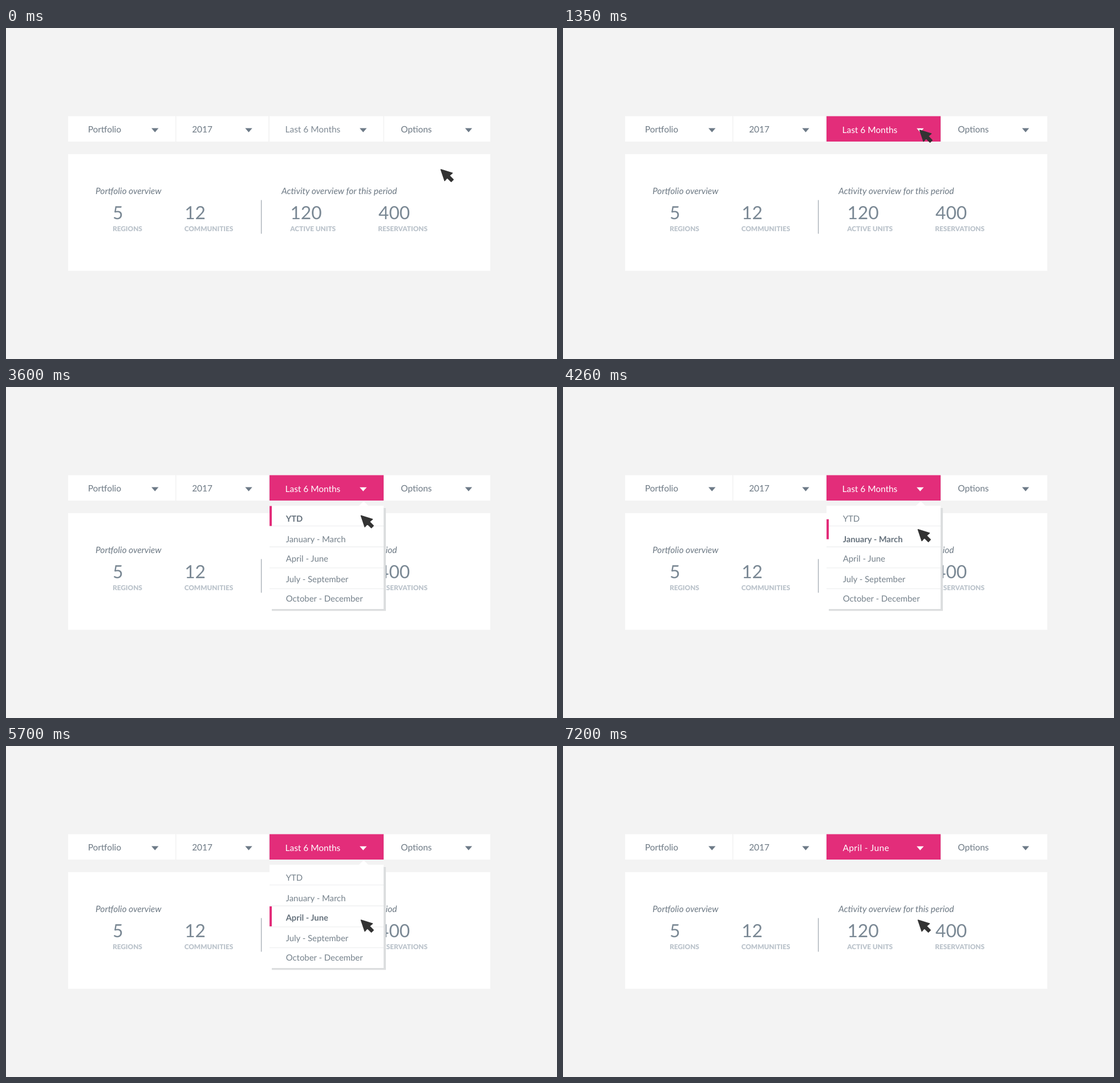
Animation of 966x580 px, one loop 8.1 s. Source, as an HTML page:

```html
<!DOCTYPE html>
<html lang="en">
<head>
<meta charset="utf-8">
<title>Period filter</title>
<style>
  html, body { margin: 0; width: 100%; height: 100%; overflow: hidden; background: #f3f3f3; }
  svg { display: block; width: 966px; height: 580px; }
  text { font-family: Lato, "Open Sans", sans-serif; fill: #6d7984; text-rendering: geometricPrecision; }
  .bar { font-size: 15.4px; }
  .soft { fill: #7f8a94; }
  .white { fill: #fff; }
  .title { font-size: 15.5px; font-style: italic; }
  .num { font-size: 31.7px; fill: #7a8894; }
  .label { font-size: 11.8px; font-weight: 900; fill: #bcc4cc; }
  .item { font-size: 14.9px; fill: #75818b; }
  .bold { font-size: 14.7px; font-weight: 700; fill: #65717c; }
  .bold.white { fill: #fff; }
  .pink { fill: #e32d7a; }
</style>
</head>
<body>
<svg viewBox="0 0 966 580">
  <path fill="#fff" d="M109 154.500H849V199H109ZM109 221H849V425.500H109Z"/>
  <path stroke="#f1f1f1" stroke-width="1.500" d="M297.700 154V199M461 154V199M662.300 154V199"/>
  <path stroke="#a3abb2" stroke-width="1.300" d="M447.600 301.500V360.500"/>
  <g id="page"></g>
  <g id="active">
    <rect class="pink" x="462" y="154.500" width="200" height="44.500"/>
    <path fill="#fff" d="M620 175.700H632.500L626.200 182.700Z"/>
    <text id="before" class="bar white" x="489.600" y="183.500">Last 6 Months</text>
    <text id="after" class="bar white" x="490.500" y="184.300" letter-spacing=".4">April - June</text>
  </g>
  <g id="menu">
    <rect x="466" y="212" width="200" height="180.300" fill="#dcdedf"/>
    <path fill="#fff" d="M462 208H619L627 200L635 208H662V389H462Z"/>
    <path stroke="#ecedee" stroke-width="1.200" d="M462 243.500H662M462 280.200H662M462 317H662M462 353.500H662"/>
    <g id="items"></g>
    <rect id="mark" class="pink" x="462" width="4" height="35"/>
    <g id="pick">
      <rect class="pink" x="462" y="281" width="200" height="35"/>
      <text class="bold white" x="490.700" y="306.300">April - June</text>
    </g>
  </g>
  <path id="cursor" fill="#333" stroke="#333" stroke-width="1.600" stroke-linejoin="round"
    d="M1 1L21 7.200L15.700 11.600L22.600 18.600L19 22.300L12 15.500L7.600 20.600Z"/>
</svg>
<script>
const $ = id => document.getElementById(id);

function addText(parent, cls, x, y, str) {
  const el = document.createElementNS("http://www.w3.org/2000/svg", "text");
  el.setAttribute("class", cls);
  el.setAttribute("x", x);
  el.setAttribute("y", y);
  el.textContent = str;
  return parent.appendChild(el);
}

function addArrow(x) {
  const el = document.createElementNS("http://www.w3.org/2000/svg", "path");
  el.setAttribute("d", `M${x - 6.2} 175.500h12.400l-6.200 7.200z`);
  el.setAttribute("fill", "#6d7a87");
  $("page").appendChild(el);
}

const page = $("page");
[["Portfolio", 143.7, 261.2], ["2017", 326.2, 425.5], ["Last 6 Months", 489.6, 626.2], ["Options", 692.3, 811]]
  .forEach(([str, x, arrow], i) => {
    addText(page, i === 2 ? "bar soft" : "bar", x, 183.3, str);
    addArrow(arrow);
  });
addText(page, "title", 157, 291, "Portfolio overview");
addText(page, "title", 483, 291, "Activity overview for this period");
[["5", 187, "REGIONS", 187], ["12", 313.2, "COMMUNITIES", 312.7],
 ["120", 498.4, "ACTIVE UNITS", 498.2], ["400", 653, "RESERVATIONS", 652.3]]
  .forEach(([num, x, label, labelX]) => {
    addText(page, "num", x, 335.3, num);
    addText(page, "label", labelX, 356, label);
  });

const items = [["YTD", 236], ["January - March", 271.7], ["April - June", 306.2],
  ["July - September", 341.5], ["October - December", 376.2]]
  .map(([str, y]) => ["item", "bold"].map(cls => addText($("items"), cls, 490.7, y, str)));

const ramp = (t, from, to) => Math.min(1, Math.max(0, (t - from) / (to - from)));
const ease = p => (1 - Math.cos(Math.PI * p)) / 2;
const show = (el, opacity) => el.setAttribute("opacity", opacity);

function draw(t) {
  const approach = ramp(t, 300, 900);
  const [toFirst, toSecond, toThird] = [3000, 3900, 4800].map(s => ramp(t, s, s + 600));
  const [first, second, third] = [toFirst, toSecond, toThird].map(ease);
  const close = ramp(t, 6600, 7200);

  const x = 761.5 - 137 * approach - 3 * toFirst;
  const y = 247 - 69 * approach + 46.5 * toFirst + 40.5 * toSecond + 39 * toThird;
  $("cursor").setAttribute("transform", `translate(${x} ${y})`);

  show($("active"), ramp(t, 1200, 1350));
  show($("before"), 1 - close);
  show($("after"), close);
  show($("menu"), ramp(t, 1680, 2190) * (1 - close));

  // The nearest row is bold; -1 means none.
  const chosen = Math.round(first + second + third) - 1;
  items.forEach(([plain, bold], i) => {
    show(plain, +(i !== chosen));
    show(bold, +(i === chosen));
  });
  show($("mark"), first);
  $("mark").setAttribute("y", 208.5 + 35.5 * second + 37 * third);
  show($("pick"), ramp(t, 6000, 6300));
}

const start = performance.now();
function tick() {
  const t = (performance.now() - start) % 8100;
  draw(Math.floor(t / 30) * 30);
  requestAnimationFrame(tick);
}
tick();
</script>
</body>
</html>
```
